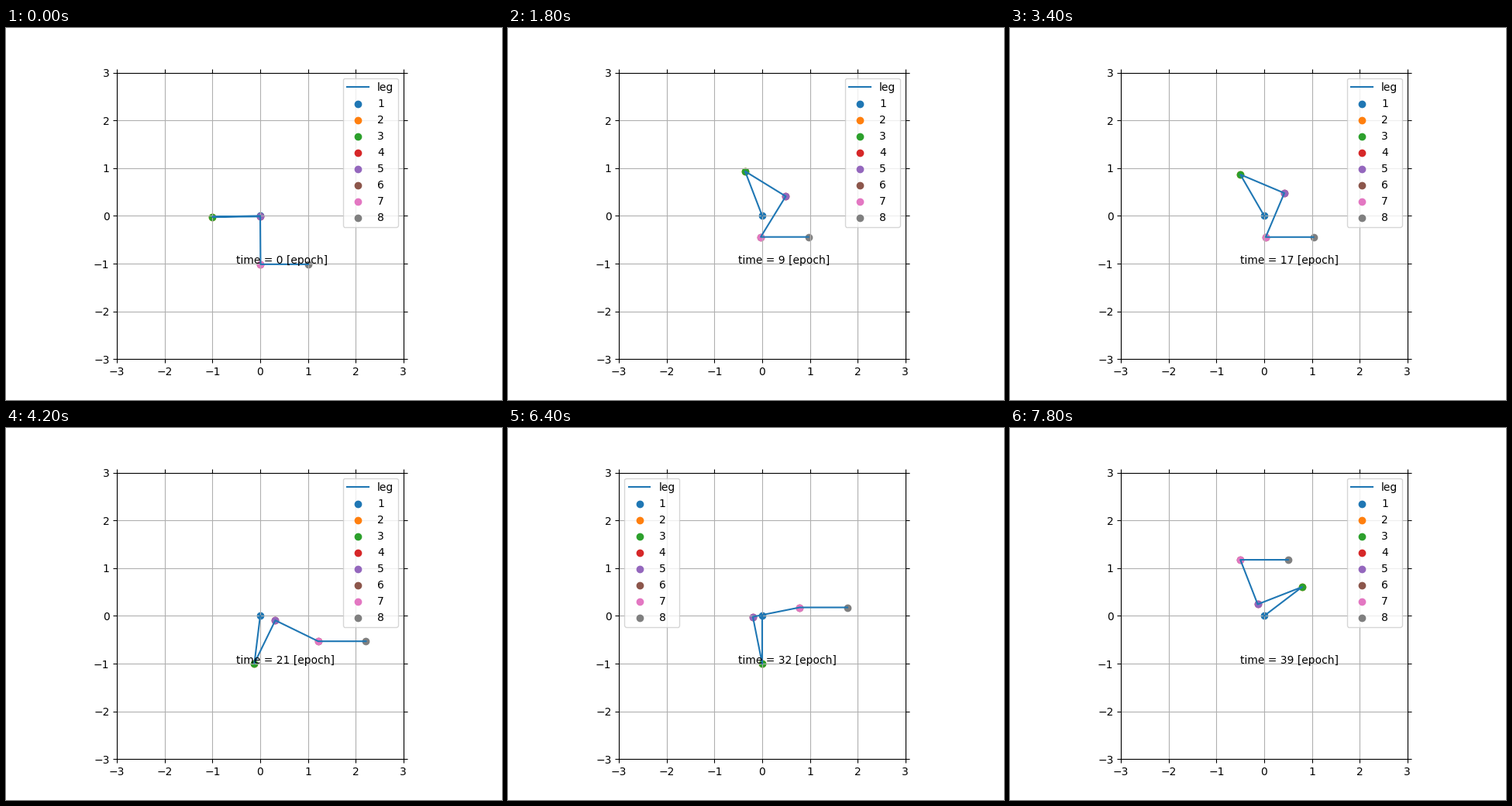
A matplotlib script that plays this animation: 640x480 px, repeating every 8000 ms.

```python
import numpy as np
import matplotlib.pyplot as plt
from matplotlib.animation import FuncAnimation

EPOCHS = 40
HIP_SWING, KNEE_SWING = 160, 40  # degrees

# Key poses: epoch, hip angle, knee angle
KEYS = [(0, 1.2, -0.8), (9, -69, 37.4), (17, -60, 37.1), (21, 83, -19),
        (27, 30.7, 40.9), (32, 90, 11.3), (39, -142.7, -16)]


def pose(epoch):
    """Ease from key to key, swinging out to alternate sides on the way."""
    i = max(k for k in range(len(KEYS) - 1) if KEYS[k][0] <= epoch)
    (t0, hip0, knee0), (t1, hip1, knee1) = KEYS[i:i + 2]
    u = (epoch - t0) / (t1 - t0)
    ease = (1 - np.cos(np.pi * u)) / 2
    swing = np.sin(np.pi * u)
    side = 1 if i % 2 else -1
    hip = hip0 + (hip1 - hip0) * ease + side * HIP_SWING * swing
    knee = knee0 + (knee1 - knee0) * ease - KNEE_SWING * swing
    return hip, knee


def unit(deg):
    a = np.radians(deg)
    return np.array([np.cos(a), np.sin(a)])


def leg_points(hip, knee):
    """Both ends of each of the four unit links, the foot kept level."""
    start = np.zeros(2)
    points = []
    for angle in (180 + hip, hip + knee, hip + knee - 90, 0):
        end = start + unit(angle)
        points += [start, end]
        start = end
    return np.array(points)


fig, ax = plt.subplots(figsize=(6.4, 4.8), dpi=100)
ax.set_aspect("equal")
ax.set_xlim(-3, 3)
ax.set_ylim(-3, 3)
ax.set_xticks(range(-3, 4))
ax.set_yticks(range(-3, 4))
ax.tick_params(top=True, right=True)
ax.grid(True)

first = leg_points(*pose(0))
line, = ax.plot(*first.T, label="leg")
dots = [ax.scatter(x, y, color=f"C{i}", label=str(i + 1))
        for i, (x, y) in enumerate(first)]
label = ax.text(-0.5, -1, "")
ax.legend(loc="best")  # moves aside when the leg reaches under it


def update(epoch):
    points = leg_points(*pose(epoch))
    line.set_data(*points.T)
    for dot, point in zip(dots, points):
        dot.set_offsets([point])
    label.set_text(f"time = {epoch} [epoch]")
    return [line, *dots, label]


anim = FuncAnimation(fig, update, frames=EPOCHS, interval=200,
                     repeat=True, repeat_delay=0, blit=False)
plt.show()
```
